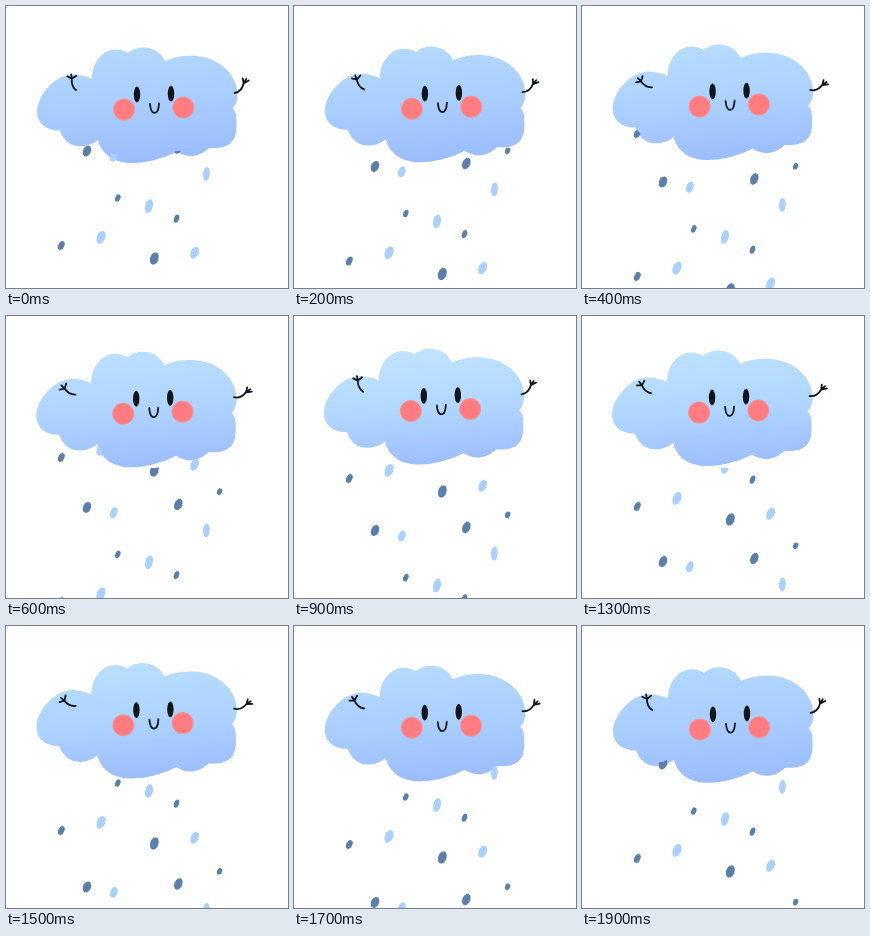
An HTML page with a canvas for the animation above (2 s loop, 282 by 282 pixels).

```html
<!DOCTYPE html>
<html lang="en">
<head>
<meta charset="utf-8">
<title>Rain cloud</title>
<style>
html, body { margin: 0; width: 100%; height: 100%; overflow: hidden; background: #fff; }
canvas { display: block; width: 100vw; height: 100vh; }
</style>
</head>
<body>
<canvas id="stage" width="282" height="282"></canvas>
<script>
const SIZE = 282, LOOP = 2000, STEP = 100;
const ctx = document.getElementById('stage').getContext('2d');
const INK = '#10151c', DARK = '#5c7fa7', LIGHT = '#aad1fd';

const cloud = new Path2D(`M31 105 C32 88 50 68 68 68.5 Q78 69 86 73
  C86 56 97 43.5 110 43.5 Q117 43.5 122 47
  C134 37 153 41 159 55 C170 50 182 49.5 190 50
  C215 52 232 70 231.5 90 Q231 98 226.5 102.5 Q231 106 230.5 117
  C231 134 226 143 203 142 C193 152 180 152 171 145.5
  C154 154 138 157 127 157 C108 157 96 149 92 134
  C79 144 60 143 54 124.5 C40 125 31 117 31 105 Z`);

// Drops only show below this line under the cloud.
const rainArea = new Path2D(`M0 118 L46 122 L55 124 L66 135 L81 136 L92 129 L99 142
  L107 148 L125 152 L150 152 L171 145 L188 144 L204 138 L${SIZE} 134 V${SIZE} H0 Z`);

const leftArm = new Path2D('M0 0 C-4 -3 -5 -7 -4.5 -12 M-4.5 -11.5 L-9 -14 M-4.5 -11.5 L-5 -16 M-4.5 -11.5 L0 -14.5');
const rightArm = new Path2D('M0 0 C5 -1 8 -5 9 -10 M9 -9.5 L8 -14.5 M9 -9.5 L11.5 -14 M9 -9.5 L14 -12.5');

// x, y at loop start, radii, tilt in degrees, colour
const drops = [
  [81, 145, 3.9, 5.7, 24, DARK],
  [172.3, 142, 3.9, 6, 24, DARK],
  [148.3, 252.5, 4.2, 6.3, 20, DARK],
  [55.3, 239.5, 3, 4.7, 25, DARK],
  [111.8, 192, 2.5, 3.9, 22, DARK],
  [170.5, 212.7, 2.5, 4.2, 20, DARK],
  [213.6, 129.3, 2.5, 3.4, 25, DARK],
  [107.8, 150.3, 3.5, 5.7, 20, LIGHT],
  [95, 231.3, 4.1, 6.7, 24, LIGHT],
  [143, 200, 3.8, 7, 14, LIGHT],
  [188.6, 246.7, 3.9, 6.4, 25, LIGHT],
  [200.4, 168, 3.4, 7, 4, LIGHT]
];

const swing = u => (1 - Math.cos(2 * Math.PI * u)) / 2;

function oval(x, y, rx, ry, tilt, color) {
  ctx.fillStyle = color;
  ctx.beginPath();
  ctx.ellipse(x, y, rx, ry, tilt * Math.PI / 180, 0, 2 * Math.PI);
  ctx.fill();
}

function arm(path, x, y, angle) {
  ctx.save();
  ctx.translate(x, y);
  ctx.rotate(angle * Math.PI / 180);
  ctx.stroke(path);
  ctx.restore();
}

function cheek(x, y) {
  oval(x, y, 11, 11, 0, '#f394a0');
  oval(x, y, 10, 10, 0, '#ff7c81');
}

function mix(a, b, k) {
  return `rgb(${a.map((v, i) => Math.round(v + (b[i] - v) * k))})`;
}

function drawCloud(rise, wave) {
  ctx.save();
  ctx.translate(-1.2 * rise, -8.8 * rise);

  const sky = ctx.createLinearGradient(122, 42, 132, 157);
  sky.addColorStop(0, mix([178, 216, 253], [192, 227, 255], rise));
  sky.addColorStop(0.5, mix([169, 205, 254], [179, 216, 255], rise));
  sky.addColorStop(1, mix([155, 188, 252], [158, 190, 255], rise));
  ctx.fillStyle = sky;
  ctx.fill(cloud);

  cheek(118, 103.6);
  cheek(177.3, 101.5);
  oval(131, 88.5, 3.2, 7.9, 0, INK);
  oval(165, 87.7, 3.2, 7.9, 0, INK);

  ctx.strokeStyle = INK;
  ctx.lineCap = ctx.lineJoin = 'round';
  ctx.lineWidth = 1.8;
  ctx.stroke(new Path2D('M144 98 C145 110 152.5 110 153 97.5'));
  arm(leftArm, 70.3, 84.3, -44 * wave);
  arm(rightArm, 228.7, 87, 27 * wave);
  ctx.restore();
}

function drawRain(t) {
  ctx.save();
  ctx.clip(rainArea);
  for (const [x, y, ...shape] of drops) {
    oval(x, y + 0.0773 * t, ...shape);
    oval(x, y + 0.07 * (t - LOOP), ...shape);
  }
  ctx.restore();
}

const start = performance.now();

function frame() {
  const t = Math.floor((performance.now() - start) % LOOP / STEP) * STEP;
  ctx.fillStyle = '#fff';
  ctx.fillRect(0, 0, SIZE, SIZE);
  drawCloud(swing(t / LOOP), swing(2 * t / LOOP));
  drawRain(t);
  requestAnimationFrame(frame);
}
frame();
</script>
</body>
</html>
```
